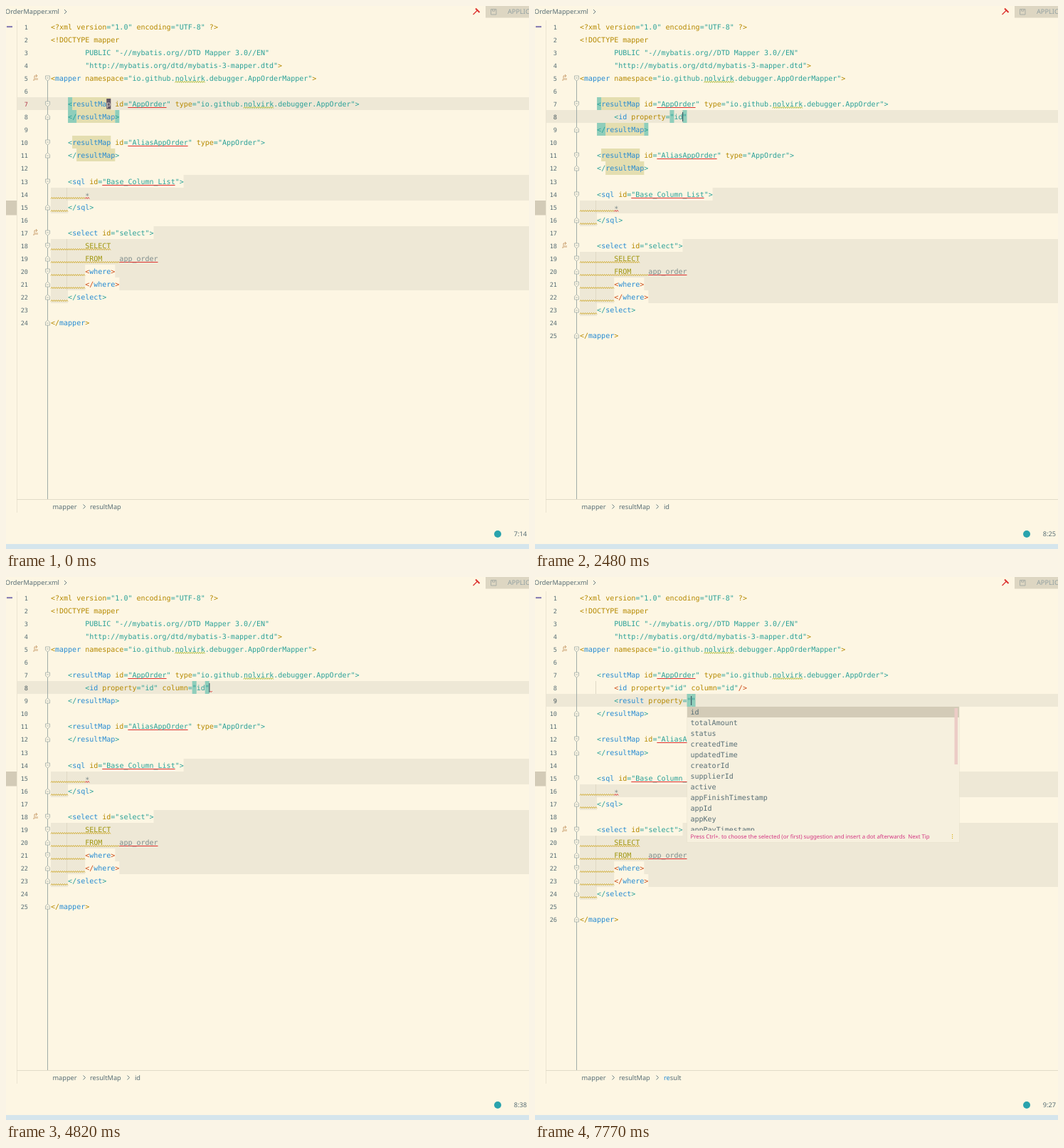
Animation of 735 by 762 pixels, one loop 8000 ms. Source, as an HTML page:

```html
<!DOCTYPE html>
<html lang="en">
<head>
<meta charset="utf-8">
<title>Mapper editor</title>
<style>
  html, body { margin: 0; width: 100%; height: 100%; overflow: hidden; background: #fdf6e3; }
  svg { display: block; }
  text { white-space: pre; text-rendering: geometricPrecision; font-variant-ligatures: none; }
  .code { font: 10px "DejaVu Sans Mono", monospace; }
  .num { font: 8.6px "DejaVu Sans Mono", monospace; text-anchor: end; }
  .ui { font: 9.2px "Noto Sans", "Open Sans", sans-serif; fill: #586e75; }
  .hint { font: 7.83px "Noto Sans", "Noto Sans CJK SC", "Noto Sans CJK", sans-serif; fill: #d33682; }
</style>
</head>
<body>
<svg id="stage" width="735" height="762" viewBox="0 0 735 762"></svg>
<script>
const LOOP = 8000, LEFT = 63, CELL = 6.02, TOP = 19.75, ROW = 18.065, ITEM = 15.07, RIGHT = 735;
const C = {
  bg: '#fdf6e3', band: '#eee8d6', gold: '#b58900', teal: '#2aa198', blue: '#268bd2',
  orange: '#cb4b16', olive: '#a0960f', grey: '#7d8c8c', ink: '#586e75', pink: '#d33682',
  tag: '#e4deb0', brace: '#8fcebb', red: '#dc322f', line: '#93a1a1', fold: '#a0aca8', wave: '#cda72a'
};

const BASE = `<?xml version="1.0" encoding="UTF-8" ?>
<!DOCTYPE mapper
        PUBLIC "-//mybatis.org//DTD Mapper 3.0//EN"
        "http://mybatis.org/dtd/mybatis-3-mapper.dtd">
<mapper namespace="io.github.nolvirk.debugger.AppOrderMapper">

    <resultMap id="AppOrder" type="io.github.nolvirk.debugger.AppOrder">
    </resultMap>

    <resultMap id="AliasAppOrder" type="AppOrder">
    </resultMap>

    <sql id="Base_Column_List">
        *
    </sql>

    <select id="select">
        SELECT
        FROM    app_order
        <where>
        </where>
    </select>

</mapper>`.split('\n');

const TAGS = ['id', 'result', 'collection', 'association', 'constructor', 'discriminator'];
const ATTRS = ['property', 'column', 'javaType', 'jdbcType', 'typeHandler'];
const PROPS = ['totalAmount', 'status', 'id', 'createdTime', 'updatedTime', 'creatorId', 'supplierId',
  'active', 'appFinishTimestamp', 'appId', 'appKey', 'appPayTimestamp'];
const IDS = ['id', 'appId', 'userId', 'orderId', 'creatorId', 'supplierId', 'tenantId'];
const COLUMNS = IDS.map(s => s.replace(/[A-Z]/g, c => '_' + c.toLowerCase()));
const MOVE_TIP = 'Ctrl+向下箭头 and Ctrl+向上箭头 will move caret down and up in the editor';
const DOT_TIP = 'Press Ctrl+. to choose the selected (or first) suggestion and insert a dot afterwards';

const popup = (col, items, typed = '', extra = {}) => ({
  col, typed, tip: DOT_TIP, ...extra,
  items: items.filter(s => s.toLowerCase().includes(typed))
});
const tagPopup = (items, typed) => popup(9, items, typed, { dtd: true, tip: MOVE_TIP });
const idFirst = ['id', ...PROPS.filter(s => s !== 'id')];

// In text, "|" marks the caret; each step changes only the fields it lists.
const ID = '<id property="id"', COL = ID + ' column=';
const STEPS = [
  [0, { done: [], text: null, line: 7, status: '7:14', crumb: null, tags: true, braces: true, quotes: [], pop: null }],
  [80, { text: '|', line: 8 }],
  [150, { status: '8:9', crumb: '' }],
  [400, { text: '<|' }],
  [480, { status: '8:10' }],
  [550, { pop: tagPopup(TAGS, '') }],
  [630, { text: '<i|' }],
  [700, { pop: tagPopup(['id', 'collection', 'association', 'discriminator'], 'i') }],
  [780, { status: '8:11', crumb: 'i' }],
  [860, { text: '<id|', status: '8:12', crumb: 'id', pop: tagPopup(['id'], 'id') }],
  [1010, { text: '<id |', pop: null }],
  [1090, { status: '8:13', pop: popup(12, ATTRS) }],
  [1320, { text: '<id p|' }],
  [1400, { pop: popup(12, ATTRS, 'p') }],
  [1470, { status: '8:14' }],
  [1700, { text: '<id property="|"', quotes: [21, 22], pop: null }],
  [1790, { pop: popup(22, PROPS, '', { scroll: true }) }],
  [1870, { status: '8:23' }],
  [2030, { text: '<id property="i|"', quotes: [21, 23], pop: popup(22, IDS, 'i') }],
  [2100, { text: '<id property="id|"', quotes: [21, 24], status: '8:25', pop: popup(22, IDS, 'id') }],
  [2480, { pop: null }],
  [2790, { text: ID + '|' }],
  [2870, { status: '8:26' }],
  [2940, { text: ID + ' |' }],
  [3020, { status: '8:27', pop: popup(26, ATTRS.slice(1)) }],
  [3570, { text: COL + '"|"', quotes: [33, 34], pop: null }],
  [3650, { status: '8:35', pop: popup(34, COLUMNS) }],
  [3800, { text: COL + '"i|"', quotes: [33, 35] }],
  [3880, { pop: popup(34, COLUMNS, 'i') }],
  [3950, { text: COL + '"id|"', quotes: [33, 36], status: '8:37', pop: popup(34, COLUMNS, 'id') }],
  [4180, { pop: null }],
  [4500, { tags: false }],
  [4670, { text: COL + '"id"|', braces: false }],
  [4820, { status: '8:38' }],
  [5430, { text: COL + '"id"/>|', quotes: [] }],
  [5510, { status: '8:40' }],
  [5740, { done: [COL + '"id"/>'], text: '|', line: 9 }],
  [5820, { status: '9:9' }],
  [5970, { crumb: null }],
  [6210, { guide: true }],
  [6440, { text: '<|' }],
  [6520, { status: '9:10', crumb: '' }],
  [6590, { text: '<r|' }],
  [6670, { status: '9:11', crumb: 'r' }],
  [6900, { text: '<re|', status: '9:12', crumb: 're' }],
  [6980, { pop: tagPopup(['result'], 're') }],
  [7060, { text: '<result|', pop: null }],
  [7140, { status: '9:16', crumb: 'result' }],
  [7220, { text: '<result |' }],
  [7290, { status: '9:17' }],
  [7370, { pop: popup(16, ATTRS) }],
  [7450, { text: '<result p|', status: '9:18', pop: popup(16, ATTRS, 'p') }],
  [7680, { text: '<result property="|"', quotes: [25, 26], pop: null }],
  [7770, { status: '9:27', pop: popup(26, idFirst, '', { scroll: true }) }]
];
let merged = {};
const STATES = STEPS.map(([at, change]) => ({ at, ...(merged = { ...merged, ...change }) }));

const esc = s => s.replace(/&/g, '&amp;').replace(/</g, '&lt;');
const colX = col => LEFT + col * CELL;
const rowY = line => Math.round(TOP + (line - 1) * ROW);
const rect = (x, y, w, h, fill) => `<rect x="${x}" y="${y}" width="${w}" height="${h}" fill="${fill}"/>`;
const path = (d, stroke, width = 1, fill = 'none') =>
  `<path d="${d}" stroke="${stroke}" stroke-width="${width}" fill="${fill}"/>`;
const text = (x, y, cls, body, fill) =>
  `<text x="${x}" y="${y}" class="${cls}"${fill ? ` fill="${fill}"` : ''}>${body}</text>`;
const span = (s, fill, dy = 0) => `<tspan fill="${fill}"${dy ? ` dy="${dy}"` : ''}>${esc(s)}</tspan>`;
const chevron = (x, y) => path(`M${x - 1.5} ${y - 3}l3 3l-3 3`, C.ink, 0.9);
const cells = (line, from, to, fill) =>
  rect(colX(from), rowY(line), (to - from) * CELL, rowY(line + 1) - rowY(line), fill);
const guide = line => path(`M85.5 ${rowY(line)}V${rowY(line + 1)}`, '#e0d9c5');
const underline = (line, from, to) => path(`M${colX(from)} ${rowY(line) + 14.5}H${colX(to)}`, C.red);

function wave(line, from, to, color) {
  const count = Math.round((to - from) * CELL / 3);
  return path(`M${colX(from)} ${rowY(line) + 15.5}` + 'l1.5 -2l1.5 2'.repeat(count), color, 0.9);
}

function paint(source) {
  const indent = source.search(/\S/);
  const prolog = /^<[?!]|PUBLIC|http/.test(source);
  const open = /^\s*<(id|re\w*)?( |$)/.test(source) && indent === 8 && !source.endsWith('>');
  const bracket = prolog ? C.gold : open ? C.teal : [C.gold, C.teal, C.orange][indent / 4] || C.teal;
  let name = false;
  return (source.match(/"[^"]*"?|<[?!]?|\/>|[\w?]+|\s+|./g) || []).map(token => {
    let fill = C.grey;
    if (/^["=]|PUBLIC/.test(token)) fill = C.teal;
    else if (/^(<|>|\/)/.test(token)) fill = bracket;
    else if (/^(SELECT|FROM)$/.test(token)) fill = C.olive;
    else if (name && !prolog) fill = C.blue;
    else if (/\w|\?/.test(token) && token !== 'app_order') fill = C.gold;
    name = token === '<' || token === '/';
    return span(token, fill, token === '*' ? 1.5 : 0);
  }).join('');
}

function foldMark(line, up) {
  const y = rowY(line) + 9.5, k = up ? -1 : 1;
  return path(`M55.5 ${y - 3.5 * k}h6v${4.5 * k}l-3 ${2.5 * k}l-3 ${-2.5 * k}z`, C.fold, 0.8, C.bg) +
    path(`M57 ${y - k * 0.5}h3`, C.fold, 0.8);
}

function drawLine(source, line, s) {
  const y = rowY(line), end = source.length, edge = (RIGHT - LEFT) / CELL;
  const star = /^ +\*/.test(source), sql = star || /SELECT|FROM/.test(source), where = /where/.test(source);
  let back = '', front = '';

  if (/<sql|<select/.test(source)) back += cells(line, end, edge, C.band);
  if (sql) back += cells(line, 0, edge, C.band);
  if (where) back += cells(line, 0, 8, C.band) + cells(line, end, edge, C.band);
  if (/<\/s/.test(source)) back += cells(line, 0, 4, C.band) + wave(line, 0, 4, C.wave);
  if (sql || where) {
    const to = /SELECT/.test(source) ? 14 : /FROM/.test(source) ? 16 : 8;
    back += guide(line) + wave(line, 0, to, C.wave);
  }
  if (s.guide && line === 8) back += guide(line);

  const at = source.search(/resultMap/);
  if (at >= 0) {
    const closing = source[at - 1] === '/';
    if (s.tags) back += cells(line, at, at + 9, C.tag);
    if (s.braces && line === 7) back += cells(line, 4, 5, C.brace);
    if (s.braces && closing && line < 10) back += cells(line, 4, 6, C.brace) + cells(line, 15, 16, C.brace);
  }
  if (line === s.line) back += s.quotes.map(q => cells(line, q, q + 1, C.brace)).join('');

  const id = /(?:resultMap|sql) id=("\w+)/.exec(source);
  if (id) {
    const from = source.indexOf('"');
    back += underline(line, from, from + id[1].length);
  }
  if (/FROM/.test(source)) back += underline(line, 16, 25);
  if (star) back += wave(line, 8, 9, C.red);
  const owner = source.indexOf('nolvirk');
  if (owner > 0) back += wave(line, owner, owner + 7, '#a3b52c');

  if (/<(mapper |resultMap|sql|select|where)|SELECT/.test(source)) front += foldMark(line, false);
  if (/<\/|FROM/.test(source)) front += foldMark(line, true);
  if (/<mapper|<select/.test(source)) {
    front += path(`M38 ${y + 12}h2v-6h4m-2 -2l2 2l-2 2`, '#c79a68', 0.9) +
      path(`M42 ${y + 12}v-3m2 3v-3`, '#c79a68', 0.9);
  }
  const current = s.text === null ? '#b3394a' : '#46565c';
  front += text(31, y + 12.5, 'num', line, line === s.line ? current : C.ink);
  return back + text(LEFT, y + 13, 'code', paint(source)) + front;
}

function drawCaret(s) {
  const y = rowY(s.line);
  if (s.text === null) {
    return rect(colX(13), y + 2, CELL, 14.5, '#5f5566') + text(colX(13), y + 13, 'code', 'p', '#d8cfc4');
  }
  const x = colX(8 + s.text.indexOf('|'));
  const dangling = s.text.endsWith('"id"|') && s.text.includes('column');
  return rect(x - 0.5, y + 3, 1.2, 13, '#3c5a64') +
    (dangling ? path(`M${x + 1} ${y + 14}l1.5 1.5l1.5 -1.5`, C.red) : '');
}

function drawPopup(p, line) {
  const x = colX(p.col) - 5.5, y = rowY(line + 1), width = 382;
  const list = Math.min(p.items.length * ITEM, 174), height = list + 16.2;
  const base = i => i * ITEM + 10.6;
  const rows = p.items.map((item, i) => {
    const hit = p.typed ? item.toLowerCase().indexOf(p.typed) : 0, to = hit + p.typed.length;
    return text(4.5, base(i), 'code',
      span(item.slice(0, hit), C.ink) + span(item.slice(hit, to), C.pink) + span(item.slice(to), C.ink)) +
      (p.dtd ? text(114.5, base(i), 'code', 'http://mybatis.org/dtd/mybatis-3-mapper.dtd', C.line) : '');
  }).join('');
  return rect(x - 0.5, y, width + 1, height + 0.8, '#e9e2ce') + rect(x, y, width, height, '#f6f0de') +
    `<svg x="${x}" y="${y}" width="${width}" height="${list}">` +
    rect(0, 0, width, ITEM, '#d3cbb7') + rows +
    (p.scroll ? rect(width - 6.5, 2, 4.5, 79, '#ecccc6') : '') + '</svg>' +
    text(x + 4.5, y + list + 10.8, 'hint', p.tip + '  Next Tip') +
    [-2.5, 0, 2.5].map(d => rect(x + width - 10, y + list + 7.5 + d, 1.1, 1.1, '#d6a800')).join('');
}

function drawFrame(s) {
  const head = s.crumb !== null ? chevron(172, 702.5) : '';
  const crumb = !s.crumb ? '' : s.crumb.startsWith('re')
    ? span('re', C.blue) + span(s.crumb.slice(2), C.ink) : s.crumb;
  return text(-1, 11.3, 'ui', 'OrderMapper.xml') + chevron(83.5, 8) +
    path('M656.5 12l6.5 -6.5', C.red, 1.2) + path('M660 3.5l5.5 5.5', C.red, 2) +
    rect(674, 0, 61, 16.5, '#ddd6c2') + path('M681.5 4.5h7.5v7.5h-7.5zm2 0v2.5h3.5v-2.5', '#a9ada5') +
    text(705, 11.3, 'ui', span('APPLIC', C.line)) +
    path('M15.5 20V711', '#ece5d1') + rect(1, 28, 8, 2.2, '#8a80b5') + rect(0, 273, 15, 20.5, '#d3cbb7') +
    path('M15 692.5H735', '#e1dbc8') +
    text(65.5, 705.7, 'ui', 'mapper') + chevron(110, 702.5) + text(118, 705.7, 'ui', 'resultMap') +
    head + text(181, 705.7, 'ui', crumb) +
    '<circle cx="691" cy="741" r="5" fill="#2aa3ad"/>' + text(713.7, 744.2, 'ui', s.status) +
    rect(0, 755, 735, 7, '#d5e5ec');
}

function draw(s) {
  const typed = s.text === null ? [] : ['        ' + s.text.replace('|', '')];
  const lines = [...BASE.slice(0, 7), ...s.done.map(d => '        ' + d), ...typed, ...BASE.slice(7)];
  return rect(0, 0, 735, 762, C.bg) +
    rect(15, rowY(s.line), 720, rowY(s.line + 1) - rowY(s.line), C.band) +
    path(`M58.5 ${rowY(5) + 9}V692`, C.fold) +
    lines.map((source, i) => drawLine(source, i + 1, s)).join('') +
    drawFrame(s) + drawCaret(s) + (s.pop ? drawPopup(s.pop, s.line) : '');
}

const stage = document.getElementById('stage');
let shown = null;
function tick() {
  const t = performance.now() % LOOP;
  const state = STATES.findLast(s => s.at <= t);
  if (state !== shown) stage.innerHTML = draw(shown = state);
  requestAnimationFrame(tick);
}
tick();
</script>
</body>
</html>
```
